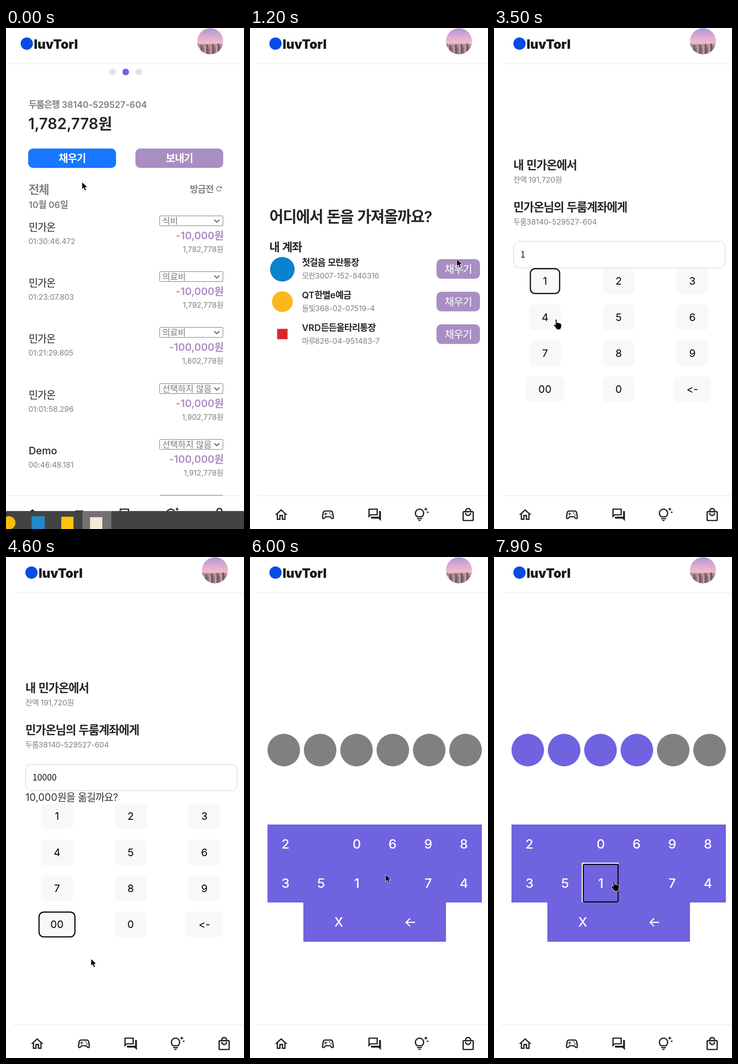
Animation, 504 px wide and 1060 px high, one loop 8000 ms. Source, as an HTML page:

```html
<!DOCTYPE html>
<html lang="ko">
<head>
<meta charset="utf-8">
<title>Account top-up</title>
<style>
html, body { margin: 0; width: 100%; height: 100%; overflow: hidden; background: #fff; }
svg { display: block; width: 504px; height: 1060px; }
text {
  font-family: Inter, "Noto Sans CJK KR", "Noto Sans CJK JP", sans-serif;
  font-variant-ligatures: none; font-feature-settings: "calt" 0; white-space: pre;
}
text.field { font-family: "Noto Sans CJK KR", "Noto Sans CJK JP", sans-serif; }
.ko { letter-spacing: -.05em; }
</style>
</head>
<body>
<svg id="stage" viewBox="0 0 504 1060" xmlns="http://www.w3.org/2000/svg">
  <defs>
    <linearGradient id="sky" x1="0" y1="0" x2="0" y2="1">
      <stop offset="0" stop-color="#b195d2"/>
      <stop offset=".3" stop-color="#d9a9d6"/>
      <stop offset=".55" stop-color="#f3bcc0"/>
      <stop offset=".62" stop-color="#b08c9c"/>
      <stop offset="1" stop-color="#65526a"/>
    </linearGradient>
    <clipPath id="round"><circle cx="442.5" cy="28" r="27.5"/></clipPath>
  </defs>
  <g id="page"></g>
  <g id="chrome"></g>
  <g id="bar"></g>
  <g id="pointer"></g>
</svg>
<script>
const LOOP = 8000, STEP = 100;
const LILAC = '#a98ec4', VIOLET = '#6f63e0', GREY = '#808080', INK = '#26262a';
const BRAND = 'luvTorl', BANK = '두룸', OWNER = '민가온', ACCOUNT = '38140-529527-604';
const $ = id => document.getElementById(id);

const rect = (x, y, w, h, fill, r = 0, extra = '') =>
  `<rect x="${x}" y="${y}" width="${w}" height="${h}" rx="${r}" fill="${fill}" ${extra}/>`;
const circle = (x, y, r, fill) => `<circle cx="${x}" cy="${y}" r="${r}" fill="${fill}"/>`;
const path = (d, color, width) =>
  `<path d="${d}" fill="none" stroke="${color}" stroke-width="${width}"/>`;
const stroke = (color, width) => `stroke="${color}" stroke-width="${width}"`;

// Hangul runs are set slightly tighter than Latin ones.
function text(x, y, str, size, weight = 400, fill = INK, anchor = 'start') {
  const runs = str.replace(/</g, '&lt;').replace(/[가-힣]+/g, s => `<tspan class="ko">${s}</tspan>`);
  return `<text x="${x}" y="${y}" font-size="${size}" font-weight="${weight}" fill="${fill}" text-anchor="${anchor}">${runs}</text>`;
}
const field = (x, y, str, size, fill, weight = 300) =>
  `<text class="field" x="${x}" y="${y}" font-size="${size}" font-weight="${weight}" fill="${fill}">${str}</text>`;
const button = (x, y, w, h, label, fill, size = 22, weight = 600) =>
  rect(x, y, w, h, fill, 10) + text(x + w / 2, y + h / 2 + size * .36, label, size, weight, '#fff', 'middle');

const ICONS = [
  'M12 5.69l5 4.5V18h-2v-6H9v6H7v-7.81l5-4.5M12 3L2 12h3v8h6v-6h2v6h6v-8h3L12 3z',
  'M21.58 16.09l-1.09-7.66C20.21 6.46 18.52 5 16.53 5H7.47C5.48 5 3.79 6.46 3.51 8.43l-1.09 7.66C2.2 17.63 3.39 19 4.94 19c.68 0 1.32-.27 1.8-.75L9 16h6l2.25 2.25c.48.48 1.13.75 1.8.75 1.56 0 2.75-1.37 2.53-2.91zm-2.1.72c-.08.09-.21.19-.42.19-.15 0-.29-.06-.39-.16L15.83 14H8.17l-2.84 2.84c-.1.1-.24.16-.39.16-.21 0-.34-.1-.42-.19-.08-.09-.16-.23-.13-.44l1.09-7.66C5.63 7.74 6.48 7 7.47 7h9.06c.99 0 1.84.74 1.98 1.72l1.09 7.66c.03.2-.05.34-.12.43zM9 8H8v2H6v1h2v2h1v-2h2v-1H9zM16 12a1 1 0 1 0 2 0a1 1 0 1 0-2 0zM14 9a1 1 0 1 0 2 0a1 1 0 1 0-2 0z',
  'M15 4v7H5.17L4 12.17V4h11m1-2H3c-.55 0-1 .45-1 1v14l4-4h10c.55 0 1-.45 1-1V3c0-.55-.45-1-1-1zm5 4h-2v9H6v2c0 .55.45 1 1 1h11l4 4V7c0-.55-.45-1-1-1z',
  'M7 20h4c0 1.1-.9 2-2 2s-2-.9-2-2zm-2-1h8v-2H5v2zm11.5-9.5c0 3.82-2.66 5.86-3.77 6.5H5.27c-1.11-.64-3.77-2.68-3.77-6.5C1.5 5.36 4.86 2 9 2s7.5 3.36 7.5 7.5zm-2 0C14.5 6.47 12.03 4 9 4S3.5 6.47 3.5 9.5c0 2.47 1.49 3.89 2.35 4.5h6.3c.86-.61 2.35-2.03 2.35-4.5zm6.87-2.13L20 8l1.37.63L22 10l.63-1.37L24 8l-1.37-.63L22 6l-.63 1.37zM19 6l.94-2.06L22 3l-2.06-.94L19 0l-.94 2.06L16 3l2.06.94L19 6z',
  'M19 6h-2c0-2.76-2.24-5-5-5S7 3.24 7 6H5c-1.1 0-2 .9-2 2v12c0 1.1.9 2 2 2h14c1.1 0 2-.9 2-2V8c0-1.1-.9-2-2-2zm-7-3c1.66 0 3 1.34 3 3H9c0-1.66 1.34-3 3-3zm7 17H5V8h14v12zm-7-8c-1.66 0-3-1.34-3-3H7c0 2.76 2.24 5 5 5s5-2.24 5-5h-2c0 1.66-1.34 3-3 3z'
];

function chrome() {
  const tones = ['#8c6f84', '#c79c98', '#6f5a72'];
  const skyline = Array.from({length: 14}, (_, i) =>
    rect(414 + 4 * i, 33 + (i * 7) % 11, 4, 22, tones[i % 3])).join('');
  const icons = ICONS.map((d, i) =>
    `<path transform="translate(${50 + 99 * i} 1014) scale(1.333)" d="${d}" fill="#222"/>`).join('');
  return circle(54, 33, 13, '#0a4be8') + text(69, 43.5, BRAND, 26.5, 900, '#1a1a1a') +
    `<g clip-path="url(#round)">${rect(414, 0, 58, 58, 'url(#sky)')}${skyline}</g>` +
    rect(16, 75, 494, 1, '#e9e9ec') + rect(16, 989, 494, 71, '#fff') + rect(16, 989, 494, 1, '#e4e4e8') + icons;
}

function taskbar() {
  return rect(0, 1022, 504, 38, '#434343') + rect(162, 1022, 61, 38, '#727272') +
    circle(6, 1047, 14, '#fbbc05') + rect(54, 1033, 28, 28, '#2489ca') +
    rect(117, 1034, 26, 26, '#ffc20e') + rect(178, 1035, 26, 26, '#f3ead8');
}

const HISTORY = [
  [OWNER, '01:30:46.472', '식비', '-10,000', '1,782,778'],
  [OWNER, '01:23:07.803', '의료비', '-10,000', '1,792,778'],
  [OWNER, '01:21:29.805', '의료비', '-100,000', '1,802,778'],
  [OWNER, '01:01:58.296', '선택하지 않음', '-10,000', '1,902,778'],
  ['Demo', '00:46:48.181', '선택하지 않음', '-100,000', '1,912,778'],
  ['', '', '', '', '']
];

function accountPage() {
  const dots = [226, 253.5, 281].map((x, i) => circle(x, 93, 7, i === 1 ? VIOLET : '#e3e3e3')).join('');
  const rows = HISTORY.map(([who, at, kind, sum, left], i) => {
    const y = Math.floor(118.35 * i);
    return rect(325.5, 397.5 + y, 134, 21, '#fff', 1, stroke('#767676', 1)) +
      field(331, 414.5 + y, kind, 18, '#777') +
      path(`M441 ${405.5 + y}l5.5 5.5 5.5-5.5`, '#555', 1.8) +
      text(48, 429 + y, who, 21.5, 500) + text(47.5, 457 + y, at, 16, 400, GREY) +
      (sum && text(460, 447 + y, sum + '원', 21.5, 600, LILAC, 'end')) +
      (left && text(460, 473.5 + y, left + '원', 16, 400, GREY, 'end'));
  }).join('');
  return dots + text(48, 169, `${BANK}은행 ${ACCOUNT}`, 18.8, 600, GREY) +
    text(47, 214, '1,782,778원', 32, 600) +
    button(47, 255, 186, 41, '채우기', '#1677ff') + button(274, 255, 186, 41, '보내기', LILAC) +
    text(48, 351, '전체', 24.5, 600, GREY) + text(439, 348, '방금전', 19, 600, GREY, 'end') +
    path('M455.5 342a5 5 0 1 1-1-5.2l1.5 1.5M456.5 334.5v4h-4', '#777', 1.4) +
    text(48, 381, '10월 06일', 19, 600, GREY) + rows;
}

function sourcePage() {
  const banks = [
    ['첫걸음 모란통장', '모란3007-152-840316', circle(68.5, 510.5, 26, '#0b82ce')],
    ['QT한별e예금', '들빛368-02-07519-4', circle(68.5, 579, 22, '#fdb61c')],
    ['VRD든든울타리통장', '마루826-04-951483-7', rect(57.5, 636.5, 22, 22, '#d7282f')]
  ];
  return text(41, 411, '어디에서 돈을 가져올까요?', 32.5, 600) + text(41, 472, '내 계좌', 24, 600) +
    banks.map(([name, no, mark], i) => {
      const y = 69 * i;
      return mark + text(110, 503 + y, name, 19, 600) + text(110, 530 + y, no, 16, 400, GREY) +
        button(395, 489 + y, 92, 41.5, '채우기', LILAC, 22, 500);
    }).join('');
}

// top is the upper edge of the amount input.
function transferForm(top, value, focused) {
  return text(41, top - 152, `내 ${OWNER}에서`, 24.5, 600) +
    text(41, top - 124, '잔액 191,720원', 16, 400, GREY) +
    text(41, top - 63, `${OWNER}님의 ${BANK}계좌에게`, 24.5, 600) +
    text(41, top - 35, BANK + ACCOUNT, 16, 400, GREY) +
    (focused ? rect(41.8, top + .8, 447.4, 55.4, '#fff', 12, stroke('#0c0c0c', 2.6))
             : rect(41.5, top + .5, 448, 56, '#fff', 12, stroke('#cfcfcf', 1))) +
    (value ? field(56, top + 34.5, value, 18.5, '#111', 400)
           : field(57, top + 33.5, '얼마나 옮길까요?', 20, '#ccc')) +
    (focused ? rect(56, top + 18, 1, 22, '#111') : '');
}

const question = (top, value) =>
  text(41, top + 81, `${Number(value).toLocaleString('en-US')}원을 옮길까요?`, 21.4, 400, '#333');

const KEYS = ['1', '2', '3', '4', '5', '6', '7', '8', '9', '00', '0', '<-'];
function amountKeys(top, active) {
  return KEYS.map((key, i) => {
    const w = key === '00' ? 82 : key === '<-' ? 78 : 68;
    const cx = 108 + 156 * (i % 3), y = Math.round(top + .2 + 76.4 * Math.floor(i / 3));
    const box = key === active
      ? rect(cx - w / 2 + 3, y + 1.2, w - 6, 52.6, '#f8f8f8', 10, stroke('#0c0c0c', 2.5))
      : rect(cx - w / 2, y, w, 54.5, '#f8f8f8', 10);
    return box + text(cx, y + 35, key, 22, 400, '#000', 'middle');
  }).join('');
}

function amountPage(t) {
  if (t < 2800) {
    return transferForm(576, '', t >= 2300) + button(41, 639, 120, 28, '잔액 191,720원 입력', LILAC, 11, 700);
  }
  if (t < 4000) {
    const typed = t >= 3400;
    return amountKeys(508, typed && '1') + transferForm(451, typed ? '1' : '', !typed);
  }
  const value = t < 4300 ? '100' : '10000';
  if (t < 5000) return transferForm(438, value) + question(435, value) + amountKeys(521, '00');
  return transferForm(499, value) + rect(488, 499, 2, 57, '#000') + question(499, value) +
    button(198, 595, 132, 28, `받는 분에게 표시 ${OWNER}`, '#3d2757', 11, 700) +
    button(41, 637, 446, 55, '옮기기', LILAC) +
    text(264, 710, '평생 수수료 무료', 16.2, 400, GREY, 'middle');
}

const PIN_CLICKS = [6900, 7200, 7400, 7700];
function pinPage(t) {
  const filled = PIN_CLICKS.filter(c => t > c).length;
  const dots = Array.from({length: 6}, (_, i) => circle(71.5 + 77 * i, 408.5, 34.5, i < filled ? VIOLET : GREY)).join('');
  const keys = [...'2 0698351 74'].map((key, i) =>
    text(75 + 75.6 * (i % 6), i < 6 ? 617 : 700, key, 27.5, 500, '#fff', 'middle')).join('');
  const ringX = filled ? 189 : t >= 6500 && t < 6700 ? 265 : 0;
  const ring = ringX && path(`M${ringX - 2} 730v-82h77`, '#fff', 2.4) +
    rect(ringX + .2, 650.2, 73.6, 79.6, 'none', 3, stroke('#0c0c0c', 2.4));
  return dots + rect(37, 566, 454, 165, VIOLET) + rect(113, 730, 302, 84, VIOLET) + keys +
    text(188, 782, 'X', 27, 500, '#fff', 'middle') +
    path('M349.5 773h-18M339 764.5l-8.5 8.5 8.5 8.5', '#fff', 2.4) + (ring || '');
}

const ARROW = 'M0 0v15l3.5-3 2.5 6 3-1.2-2.6-5.8h5z';
const HAND = 'M0 1.5q1.5-2.5 3 0v6.5l1.5-.8 2 1 2-.3 1.5 1.3 2 .3.8 2v4.5l-2 4v2h-8l-1.5-3-4.8-6q0-2.5 2-2l2 1.5z';
const TRAIL = [
  [0, 161, 326, ARROW], [300, 142, 280, HAND], [600, 142, 280, ARROW], [800, 240, 360, ARROW],
  [1200, 438, 489, ARROW], [1300, 440, 505, HAND], [1600, 440, 505, ARROW], [2200, 227, 586, ''],
  [2800, 227, 586, ARROW], [3200, 110, 542, HAND], [3400, 110, 542, HAND], [3500, 130, 616, HAND],
  [3800, 112, 768, HAND], [4400, 112, 768, HAND], [4600, 180, 850, ARROW], [5000, 285, 850, ARROW],
  [5400, 287, 695, ARROW], [5600, 280, 662, HAND], [5800, 280, 662, ARROW], [6300, 300, 690, HAND],
  [6600, 300, 690, HAND], [6800, 252, 685, HAND], [LOOP, 252, 685, HAND]
];
const CLICKS = [500, 1500, 2400, 3300, 3900, 4200, 4900, 5700];

function pointer(t) {
  const i = TRAIL.findIndex(k => k[0] > t);
  const [t0, x0, y0, shape] = TRAIL[i - 1], [t1, x1, y1] = TRAIL[i];
  const p = (t - t0) / (t1 - t0), e = p * p * (3 - 2 * p);
  const x = x0 + (x1 - x0) * e, y = y0 + (y1 - y0) * e;
  return (CLICKS.includes(t) ? circle(x, y, 5.2, '#d81e28') : '') +
    `<path d="${shape}" transform="translate(${x} ${y})" fill="#000" stroke="#fff" stroke-width=".8"/>`;
}

let last = -1;
function render(ms) {
  const t = Math.floor(ms % LOOP / STEP) * STEP;
  if (t === last) return;
  last = t;
  const first = t < 600;
  $('page').innerHTML = first ? accountPage() : t < 1600 ? sourcePage() : t < 5800 ? amountPage(t) : pinPage(t);
  $('chrome').setAttribute('transform', `translate(${first ? -10 : 0} 0)`);
  $('bar').setAttribute('visibility', first ? 'visible' : 'hidden');
  $('pointer').innerHTML = pointer(t);
}

$('chrome').innerHTML = chrome();
$('bar').innerHTML = taskbar();
const start = performance.now();
(function tick() {
  render(performance.now() - start);
  requestAnimationFrame(tick);
})();
</script>
</body>
</html>
```
